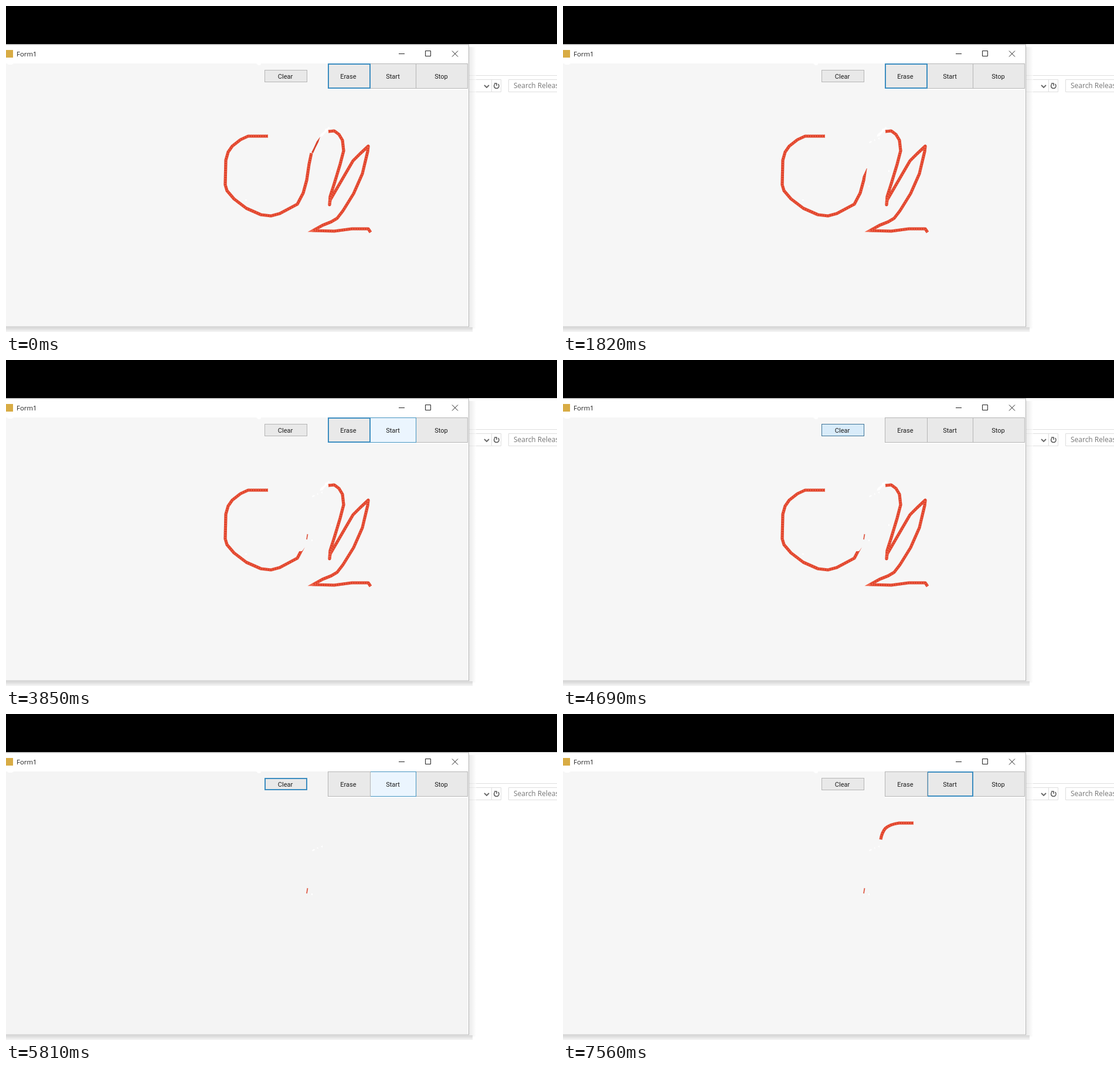
An HTML page for the animation above (7630 ms loop, 940 px wide and 556 px high).

```html
<!DOCTYPE html>
<html lang="en">
<head>
<meta charset="utf-8">
<title>Form1</title>
<style>
  html, body { margin: 0; width: 100%; height: 100%; overflow: hidden; background: #fff; }
  svg { display: block; width: 940px; height: 556px; }
  text { font: 12px "Open Sans", sans-serif; fill: #222; }
  .button text { font: 11px Roboto, sans-serif; text-anchor: middle; fill: #1c1c1c; }
  .thin { fill: none; stroke: #222; }
  .pale { fill: none; stroke: #dedede; }
  .ink { fill: none; stroke: #e0452d; stroke-width: 5.2; stroke-linejoin: round; }
  .grain { fill: none; stroke: #f0664c; stroke-width: 5.2; stroke-dasharray: 1 3; }
</style>
</head>
<body>
<svg viewBox="0 0 940 556">
  <defs>
    <linearGradient id="sideShade"><stop stop-color="#dcdcdc"/><stop offset="1" stop-color="#fff"/></linearGradient>
    <linearGradient id="bottomShade" x2="0" y2="1"><stop stop-color="#d6d6d6"/><stop offset="1" stop-color="#f6f6f6"/></linearGradient>
    <clipPath id="kept"><path id="keptShape"/></clipPath>
    <clipPath id="sliverClip"><rect id="sliverShape" x="500" width="50" height="60"/></clipPath>
    <clipPath id="drawn"><rect id="drawnShape" y="180" width="80"/></clipPath>
  </defs>

  <!-- window behind -->
  <rect width="940" height="556" fill="#fff"/>
  <rect width="940" height="65" fill="#000"/>
  <g class="pale">
    <path d="M790 118.5H940M790 125.5H844.5V146.5H790M828.5 126V146M940 125.5H857.5V146.5H940"/>
  </g>
  <path d="M816 135l4 4 4-4" fill="none" stroke="#666" stroke-width="1.8"/>
  <path d="M839.5 133.2A4.2 4.2 0 1 1 834 133.3M833 132h4v4" fill="none" stroke="#555" stroke-width="1.5"/>
  <text x="866" y="140" style="fill:#777">Search Release</text>

  <!-- form window -->
  <rect x="790" y="70" width="12" height="480" fill="url(#sideShade)" opacity=".6"/>
  <rect y="548" width="796" height="8" fill="url(#bottomShade)"/>
  <rect x="-2" y="66" width="791.5" height="481" fill="#fff" stroke="#b4b4b4"/>
  <rect id="canvas" y="98" width="788" height="448"/>
  <path d="M2 98h11l-3 2H4zM427 98h8l-1 3h-4zM549 141h239v2H549z" fill="#fff"/>
  <rect y="75" width="12" height="13" fill="#d8ac45"/>
  <text x="18" y="86" style="font-size:11.4px">Form1</text>
  <path class="thin" d="M670 81.5h10M715.5 76.5h9v9h-9zM761 76.5l10 10M771 76.5l-10 10"/>
  <g id="buttons"></g>

  <g id="sketch">
    <path d="M537 218l6-4 2-5 3 0 2-3 3 2-4 4-5 5-4 5-5 1zM408 330h3v2h-3zM555 280h2v3h-2z" fill="#fff"/>
    <path id="crumbs" d="M522 232l4-2 1 2-4 2zM530 229l2-2 1 3zM537 226l3-2v4zM521 306h2v3h-2z" fill="#fff"/>
    <g clip-path="url(#kept)" data-ink="M447 222H413L400 228 386 239 379 249 375 263 374 305 377 315 389 329 410 345 435 356 452 358 467 354 497 338 507 319 513 297 517 270 521 251"></g>
    <path id="sliver" clip-path="url(#sliverClip)" d="M536 223l-6 8-5 11-4 8 3 1 4-9 5-10z" fill="#d9432d"/>
    <path id="shard" d="M514.5 297l-1.5 9" fill="none" stroke="#e0604c" stroke-width="1.8"/>
    <g data-ink="M550 214L560 213 568 219 574 229 576 247 570 270 560 303 553 325 552 339 553 331 578 288 592 264 604 252 618 239 617 248 608 286 593 320 575 349 565 362 555 368 540 374 524 383 560 384 590 380 618 380 622 386"></g>
  </g>
  <g id="fresh" clip-path="url(#drawn)" data-ink="M598 186H573Q558 188 550 195 544 202 542 214"></g>
</svg>
<script>
const LOOP = 7630, STEP = 70;
const $ = id => document.getElementById(id);
const svg = (tag, parent, attrs) => {
  const node = document.createElementNS("http://www.w3.org/2000/svg", tag);
  for (const k in attrs) node.setAttribute(k, attrs[k]);
  return parent.appendChild(node);
};
const ramp = (t, from, to) => Math.min(1, Math.max(0, (t - from) / (to - from)));
const show = (id, on) => $(id).setAttribute("visibility", on ? "visible" : "hidden");

for (const g of document.querySelectorAll("[data-ink]"))
  for (const layer of ["ink", "grain"]) svg("path", g, { class: layer, d: g.dataset.ink });

// fill, border colour, border width
const LOOKS = {
  idle: ["#e9e9e9", "#b5b5b5", 1],
  hover: ["#ebf5fe", "#4594bf", 1],
  focus: ["#e9e9e9", "#3c8dc0", 2],
  focusHover: ["#ebf5fe", "#3c8dc0", 2],
  press: ["#d9ecfa", "#3d7398", 1]
};

function makeButton(label, x, y, w, h, textX) {
  const g = svg("g", $("buttons"), { class: "button" });
  const box = svg("rect", g, {});
  svg("text", g, { x: textX, y: 124 }).textContent = label;
  return look => {
    const [fill, stroke, b] = LOOKS[look];
    const attrs = { x: x + b / 2, y: y + b / 2, width: w - b, height: h - b, fill, stroke, "stroke-width": b };
    for (const k in attrs) box.setAttribute(k, attrs[k]);
  };
}
const stop = makeButton("Stop", 699, 98, 89, 43, 742.5);
const start = makeButton("Start", 621, 98, 79, 43, 660);
const erase = makeButton("Erase", 549, 98, 73, 43, 584);
const clear = makeButton("Clear", 441, 109, 73, 21, 476.5);
stop("idle");

// the look of the last entry that has begun
const lookAt = (t, timeline) => timeline.filter(([begin]) => t >= begin).pop()[1];

const freshPath = $("fresh").firstChild, freshLength = freshPath.getTotalLength();

function draw(t) {
  clear(lookAt(t, [[0, "idle"], [4340, "hover"], [4550, "press"], [4760, "focusHover"], [5390, "focus"], [6090, "idle"]]));
  erase(lookAt(t, [[0, "focus"], [4550, "idle"], [5600, "hover"], [5810, "idle"]]));
  start(lookAt(t, [[0, "idle"], [3150, "hover"], [3920, "idle"], [5810, "hover"], [6090, "press"], [6370, "focusHover"], [6510, "focus"]]));

  $("canvas").setAttribute("fill", t >= 4760 && t < 7000 ? "#f4f4f4" : "#f6f6f6");
  show("sketch", t < 4760);
  show("sliver", t < 560);
  show("crumbs", t >= 560);
  show("shard", t >= 2450);
  $("sliverShape").setAttribute("y", 222 + 30 * ramp(t, 0, 560));

  // the eraser eats the right arm from the top down
  const cut = t >= 2450 ? 312 : 250 + 30 * ramp(t, 630, 1260) + 17 * ramp(t, 1820, 2240);
  const slant = 14 * ramp(t, 630, 1260);
  $("keptShape").setAttribute("d", `M0 0H480V${cut + slant}H${t >= 2450 ? 505 : 510}L518 ${cut - 3}H530V400H0Z`);

  const p = ramp(t, 6930, 7560);
  const tip = freshPath.getPointAtLength(p * freshLength);
  $("drawnShape").setAttribute("x", tip.x - 3);
  $("drawnShape").setAttribute("height", tip.y + 3 - 180);
  show("fresh", p > 0);
}

function tick() {
  draw(Math.floor(performance.now() % LOOP / STEP) * STEP);
  requestAnimationFrame(tick);
}
tick();
</script>
</body>
</html>
```
